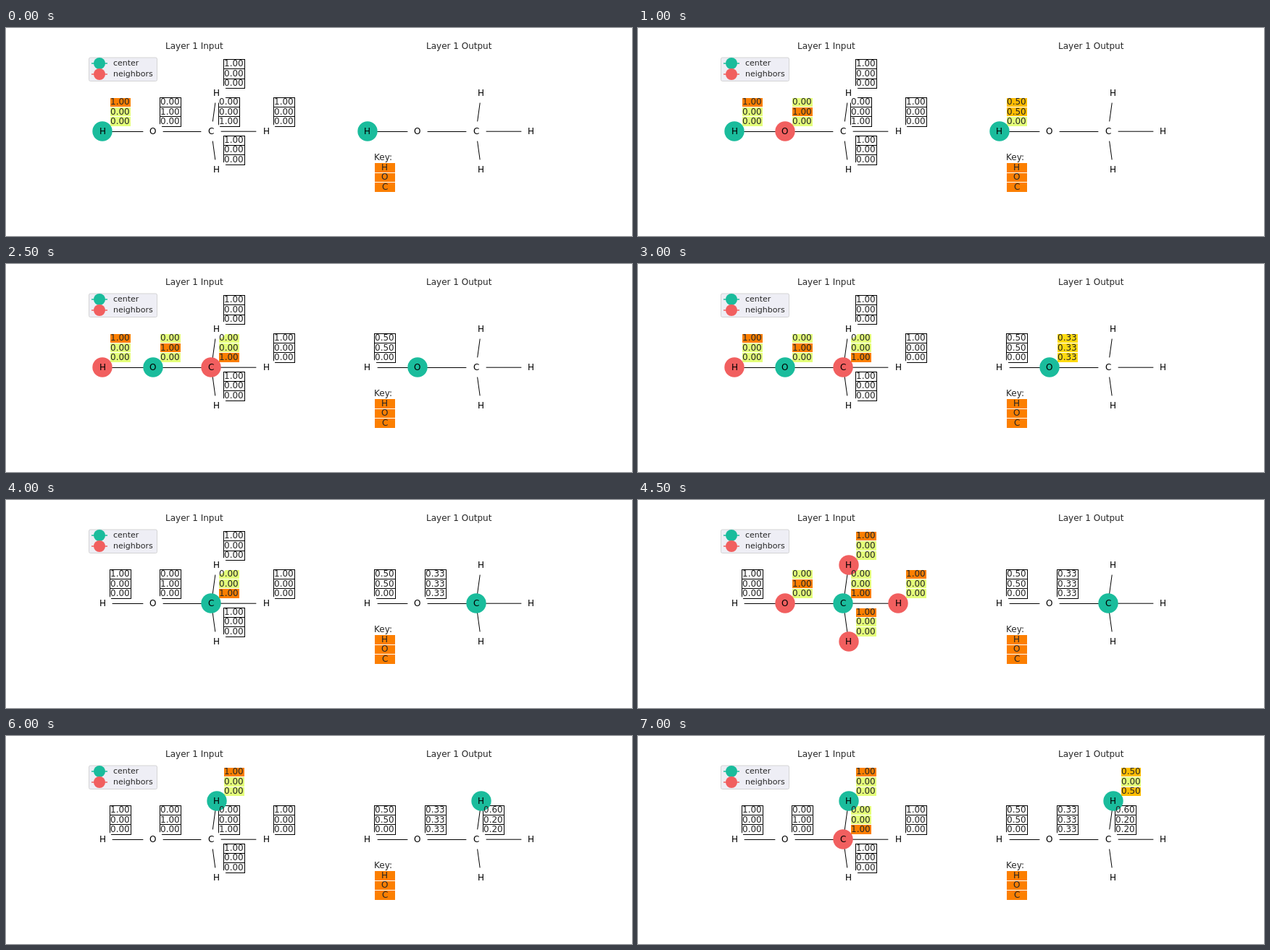
Recreate the animation shown at these times as an HTML page. Size 864x288 px, loop 8 s.

```html
<!DOCTYPE html>
<html lang="en">
<head>
<meta charset="utf-8">
<title>Graph layer averaging</title>
<style>
  html, body { margin: 0; width: 100%; height: 100%; overflow: hidden; background: #fff; }
  svg { display: block; width: 864px; height: 288px; }
  text { font: 12px "DejaVu Sans", sans-serif; fill: #262626; }
  .small { font-size: 11px; }
  .atom { fill: #000; }
  .edge { stroke: #000; stroke-width: 1; }
  .cell { fill: #fff; stroke: #000; stroke-width: 1; }
</style>
</head>
<body>
<svg id="stage" viewBox="0 0 864 288"></svg>
<script>
const TEAL = '#1abc9c', RED = '#f15f5f';
const LOOP = 8000, TURN = 2000;
const SHIFT = 365.35;
const CELL_W = 28.8, ROW_H = 13.38;

// element, position, neighbours
const atoms = [
  ['H', 133.3, 143.2, [1]],
  ['O', 202.85, 143.2, [0, 2]],
  ['C', 283.45, 143.2, [1, 3, 4, 5]],
  ['H', 290.65, 90.4, [2]],
  ['H', 359.3, 143.23, [2]],
  ['H', 290.65, 196.1, [2]]
];
const kinds = ['H', 'O', 'C'];
const inputs = atoms.map(([kind]) => kinds.map(k => +(k === kind)));
const outputs = atoms.map(([, , , near], i) => {
  const group = [i, ...near];
  return kinds.map((_, k) => group.reduce((sum, g) => sum + inputs[g][k], 0) / group.length);
});

const stage = document.getElementById('stage');

function add(parent, tag, attrs, content) {
  const el = document.createElementNS('http://www.w3.org/2000/svg', tag);
  for (const key in attrs) el.setAttribute(key, attrs[key]);
  if (content !== undefined) el.textContent = content;
  parent.appendChild(el);
  return el;
}

// text starts on whole pixels
const label = (parent, x, y, str, cls = '') =>
  add(parent, 'text', { x: Math.round(x), y: Math.round(y), class: cls }, str);

function centered(parent, cx, y, str, cls) {
  const el = label(parent, cx, y, str, cls);
  el.setAttribute('x', Math.round(cx - el.getComputedTextLength() / 2));
}

const [cellLayer, edgeLayer, discLayer, textLayer] = [0, 0, 0, 0].map(() => add(stage, 'g', {}));

const snap = v => Math.round(v) + 0.5;

// colour ramp from lime through yellow to orange
const ramp = [[228, 255, 122], [255, 232, 26], [255, 189, 0], [255, 160, 0], [252, 127, 0]];
function heat(v) {
  const i = Math.min(3, Math.floor(v * 4)), f = v * 4 - i;
  return `rgb(${ramp[i].map((c, k) => Math.round(c + f * (ramp[i + 1][k] - c)))})`;
}

function makeTable(cx, top, words, values) {
  const box = add(cellLayer, 'g', {}), ink = add(textLayer, 'g', {});
  const x = snap(cx - CELL_W / 2), width = snap(cx + CELL_W / 2) - x;
  const cells = words.map((word, r) => {
    const y = snap(top + r * ROW_H), height = snap(top + (r + 1) * ROW_H) - y;
    centered(ink, cx, top + (r + 0.5) * ROW_H + 3.8, word);
    return add(box, 'rect', { x, y, width, height, class: 'cell' });
  });
  return {
    show(on) {
      box.style.display = ink.style.display = on ? '' : 'none';
    },
    light(on) {
      cells.forEach((cell, r) => {
        cell.style.fill = on ? heat(values[r]) : '';
        cell.style.stroke = on ? '#fff' : '';
      });
    }
  };
}

function makeGraph(dx, data) {
  atoms.forEach(([, x, y, near], i) => near.filter(j => j > i).forEach(j => {
    const [, x2, y2] = atoms[j];
    const [y1, yEnd] = y === y2 ? [snap(y), snap(y)] : [y, y2];
    add(edgeLayer, 'line', { x1: x + dx, y1, x2: x2 + dx, y2: yEnd, class: 'edge' });
  }));
  return atoms.map(([kind, x, y], i) => {
    const cx = x + dx;
    const disc = add(discLayer, 'circle', { cx: Math.round(cx), cy: Math.round(y), r: 13.7 });
    centered(textLayer, cx, y + 3.6, kind, 'atom');
    const table = makeTable(cx + 24, y - 47.5, data[i].map(v => v.toFixed(2)), data[i]);
    return { disc, table };
  });
}

const left = makeGraph(0, inputs);
const right = makeGraph(SHIFT, outputs);

centered(textLayer, 260, 29, 'Layer 1 Input');
centered(textLayer, 625.5, 29, 'Layer 1 Output');

label(textLayer, 508, 183, 'Key:');
makeTable(522.7, 186.45, kinds, [1, 1, 1]).light(true);

add(textLayer, 'rect', {
  x: 114.5, y: 41, width: 94, height: 32.5, rx: 2, fill: '#eeeef5', stroke: '#ccc', 'stroke-opacity': 0.8
});
[['center', TEAL, 49], ['neighbors', RED, 64]].forEach(([name, color, y]) => {
  add(textLayer, 'line', { x1: 118, y1: y, x2: 140, y2: y, stroke: color, 'stroke-width': 1.5 });
  add(textLayer, 'circle', { cx: 129, cy: y, r: 8, fill: color });
  label(textLayer, 148, y + 3, name, 'small');
});

// each turn: centre alone, then its neighbours, then the averaged result
function draw(center, phase) {
  const near = phase > 0 ? atoms[center][3] : [];
  atoms.forEach((_, i) => {
    const isCenter = i === center, isNear = near.includes(i);
    left[i].disc.style.fill = isCenter ? TEAL : isNear ? RED : '#fff';
    left[i].table.light(isCenter || isNear);
    right[i].disc.style.fill = isCenter ? TEAL : '#fff';
    right[i].table.show(i < center || (isCenter && phase === 2));
    right[i].table.light(isCenter);
  });
}

let last = '';
function tick() {
  const t = performance.now() % LOOP;
  const center = Math.floor(t / TURN);
  const phase = Math.min(2, Math.floor((t % TURN) / 500));
  const state = center + '/' + phase;
  if (state !== last) draw(center, phase);
  last = state;
  requestAnimationFrame(tick);
}
tick();
</script>
</body>
</html>
```
